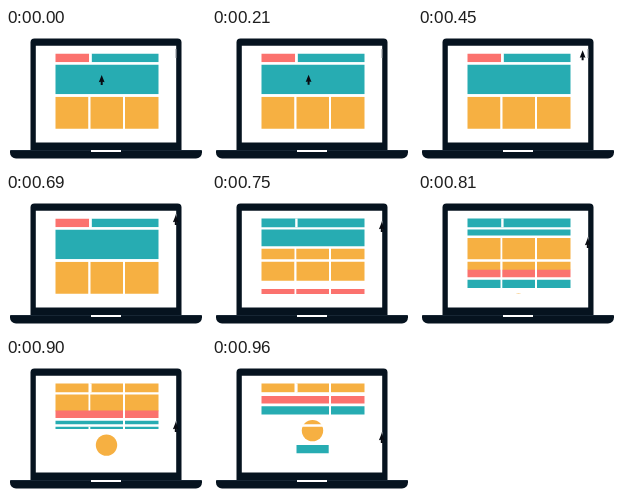
An HTML page with a canvas that plays this animation: 200x137 px, repeating every 1830 ms.

```html
<!DOCTYPE html>
<html lang="en">
<head>
<meta charset="utf-8">
<title>Scrolling laptop</title>
<style>
html, body { margin: 0; width: 100%; height: 100%; overflow: hidden; background: #fff; }
canvas { display: block; }
</style>
</head>
<body>
<canvas id="stage" width="200" height="137"></canvas>
<script>
const ctx = document.getElementById('stage').getContext('2d');
const LOOP = 1830, STEP = 30;
const RED = '#fb726e', TEAL = '#27acb2', ORANGE = '#f6b042';
const NAVY = '#06131f', WHITE = '#fff';
const LEFT = 49.5, WIDE = 103;
const COLUMNS = [[LEFT, 33], [84.3, 32.7], [119, 33.5]];
const TIMES = [720, 750, 840, 960];

function rect(x, y, w, h, color, radii = 0) {
  ctx.fillStyle = color;
  ctx.beginPath();
  ctx.roundRect(x, y, w, h, radii);
  ctx.fill();
}

// Linear interpolation between values placed at TIMES
function track(t, values) {
  if (t <= TIMES[0]) return values[0];
  for (let i = 1; i < TIMES.length; i++) {
    if (t <= TIMES[i]) {
      const u = (t - TIMES[i - 1]) / (TIMES[i] - TIMES[i - 1]);
      return values[i - 1] + (values[i] - values[i - 1]) * u;
    }
  }
  return values[values.length - 1];
}

function smooth(t, from, to) {
  const u = Math.min(1, Math.max(0, (t - from) / (to - from)));
  return u * u * (3 - 2 * u);
}

function drawLaptop() {
  rect(0, 0, 200, 137, WHITE);
  rect(24.5, 10.5, 151, 112, NAVY, [4, 4, 0, 0]);
  rect(29.8, 17.7, 140.4, 96.7, WHITE);
  rect(4, 122, 192, 8.5, NAVY, [1, 1, 6, 6]);
  rect(5, 122, 190, 0.8, '#1d2d3b');
  rect(85, 122, 30, 2, WHITE);
}

function drawPage(t) {
  const top = -track(t, [0, 13, 29, 66]);
  const low = track(t, [105, 96, 67, 38]);

  ctx.save();
  ctx.beginPath();
  ctx.rect(49, 25.5, 104, 75.5);
  ctx.clip();

  rect(LEFT, top + 25.5, 33.7, 8.7, RED);
  rect(85.6, top + 25.5, 66.9, 8.7, TEAL);
  rect(LEFT, top + 36.5, WIDE, 29.7, TEAL);
  for (const [x, w] of COLUMNS) rect(x, top + 68.7, w, 32, ORANGE);

  [[0, 7.5, RED], [10.2, 8.2, TEAL]].forEach(([y, h, color]) => {
    rect(LEFT, low + y, 67.5, h, color);
    rect(119, low + y, 33.5, h, color);
  });
  ctx.fillStyle = ORANGE;
  ctx.beginPath();
  ctx.arc(100.5, low + 34.6, 10.7, 0, Math.PI * 2);
  ctx.fill();
  rect(84.3, low + 49, 32.4, 8.2, TEAL);

  // White gutters stay in place while the blocks pass beneath
  rect(49, 34.2, 104, 2.3, WHITE);
  rect(49, 66.2, 104, 2.5, WHITE);
  rect(83.2, 25, 2.4, 9.2, WHITE);
  rect(82.5, 68.7, 1.8, 33, WHITE);
  rect(117, 68.7, 2, 33, WHITE);
  ctx.restore();
}

function drawPointer(t) {
  const drag = track(t, [0, 7, 31, 53]);
  const x = 95.7 + 74.1 * smooth(t, 190, 500);
  const y = 47 - 25 * smooth(t, 190, 470) + drag;

  rect(169.5, 21 + drag, 1, 9, '#8d9299');
  ctx.fillStyle = '#080b12';
  ctx.beginPath();
  [[0, 0], [2.9, 7.3], [1, 6.8], [1, 10], [-1, 10], [-1, 6.8], [-2.9, 7.3]]
    .forEach(([dx, dy]) => ctx.lineTo(x + dx, y + dy));
  ctx.fill();
}

function draw(now) {
  const t = Math.floor((now % LOOP) / STEP) * STEP;
  drawLaptop();
  drawPage(t);
  drawPointer(t);
  requestAnimationFrame(() => draw(performance.now() - start));
}

const start = performance.now();
draw(0);
</script>
</body>
</html>
```
